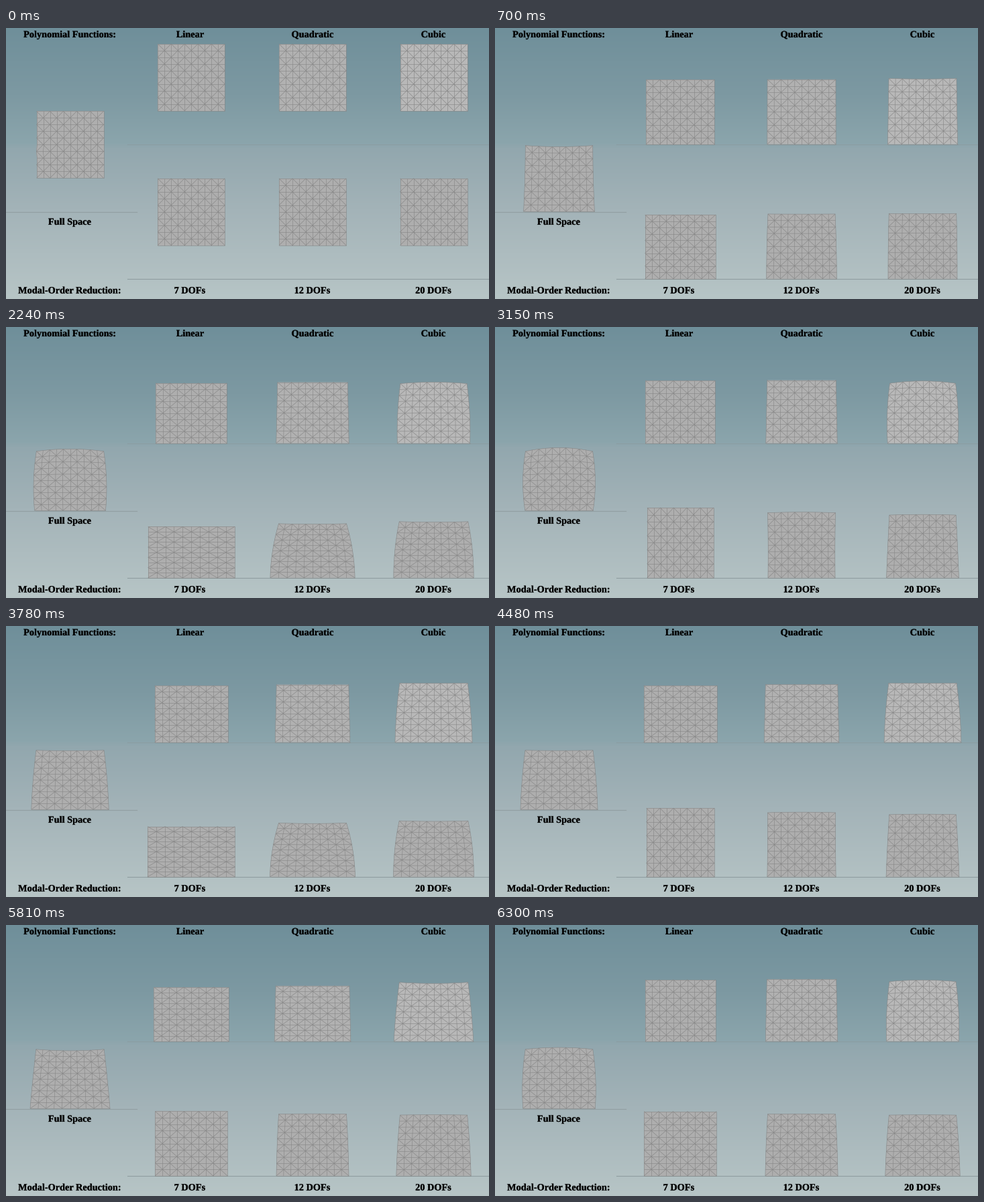
Recreate the animation shown at these times as a matplotlib script. Size 720x405 px, loop 6.37 s.

```python
import numpy as np
import matplotlib.pyplot as plt
from matplotlib.animation import FuncAnimation
from matplotlib.collections import LineCollection
from matplotlib.patches import Polygon
from matplotlib.patheffects import withStroke

W, H, DPI = 720, 405, 100
FRAMES, STEP = 91, 70
CELLS, SIDE, DROP = 10, 100, 50
CONTACT, PERIOD, SETTLE = 9.5, 21, 4
PX = 72 / DPI


def trapezoid(base, top, height):
    return [base, (base + top) / 2, top, height, height]


def box(half, height):
    return trapezoid(half, half, height)


# A pose is: half-width at base, middle and top, height at corners and centre.
REST = np.array(box(SIDE / 2, SIDE))
SAGGED = [57, 55, 50.5, 88.5, 88.5]


class Block:
    """Soft square that falls, hits the ground and wobbles around a sagged pose."""

    def __init__(self, ax, cx, ground, grey, sagged, amp, squash, decay):
        self.cx, self.ground = cx, ground
        self.sagged, self.amp = np.array(sagged), np.array(amp)
        self.squash, self.decay = squash, decay
        self.jolt = REST - self.swing(CONTACT)
        self.body = ax.add_patch(Polygon([(0, 0)] * 3, fc=grey, ec="none", zorder=3))
        self.wires = LineCollection([], colors="#868686", linewidths=0.6 * PX, zorder=4)
        ax.add_collection(self.wires)

    def swing(self, t):
        """Damped oscillation, most squashed first at time self.squash."""
        dt = t - self.squash
        wave = np.cos(2 * np.pi * dt / PERIOD) * np.exp(-self.decay * dt)
        return self.sagged + self.amp * wave

    def draw(self, frame):
        if frame <= CONTACT:
            pose, lift = REST, DROP * (1 - (frame / CONTACT) ** 2)
        else:
            pose = self.swing(frame) + self.jolt * np.exp((CONTACT - frame) / SETTLE)
            lift = 0
        base, mid, top, corner, centre = pose
        u, v = np.meshgrid(np.linspace(-1, 1, CELLS + 1), np.linspace(1, 0, CELLS + 1))
        half = (base * (1 - v) * (1 - 2 * v) + mid * 4 * v * (1 - v)
                + top * v * (2 * v - 1))
        x = self.cx + u * half
        y = self.ground - lift - v * corner - v**2 * (centre - corner) * (1 - u**2)
        grid = np.stack([x, y], axis=-1)

        cols = np.arange(CELLS + 1)
        zigzags = [grid[row + (row + cols) % 2, cols] for row in range(CELLS)]
        self.wires.set_segments(list(grid) + list(grid.transpose(1, 0, 2)) + zigzags)
        self.body.set_xy(np.concatenate(
            [grid[0], grid[1:, -1], grid[-1, -2::-1], grid[-2:0:-1, 0]]))


fig = plt.figure(figsize=(W / DPI, H / DPI), dpi=DPI)
ax = fig.add_axes([0, 0, 1, 1])
ax.axis("off")

# Sky gradient
stops = [0, 100, 172, 180, 270, H]
tones = np.array([(111, 143, 154), (125, 153, 162), (139, 165, 172),
                  (146, 167, 174), (163, 179, 184), (183, 197, 198)]) / 255
rows = np.arange(H) + 0.5
sky = np.stack([np.interp(rows, stops, tone) for tone in tones.T], axis=-1)
ax.imshow(sky[:, None, :], extent=(0, W, H, 0), aspect="auto",
          interpolation="nearest", zorder=0)
ax.set_xlim(0, W)
ax.set_ylim(H, 0)

# Ground lines
UPPER, MIDDLE, LOWER = 173.7, 274.3, 374.8
for x0, x1, y, tone in [(181, W, UPPER, "#8b9da2"), (0, 195, MIDDLE, "#919fa2"),
                        (181, W, LOWER, "#8f9da0")]:
    ax.plot([x0, x1], [y + 0.6] * 2, color=tone, lw=1.1 * PX, zorder=2)

# Labels
halo = [withStroke(linewidth=1.4, foreground=(0, 0, 0, 0.07))]
for x, y, text in [
    (95, 14, "Polynomial Functions:"), (274.5, 14, "Linear"),
    (457, 14, "Quadratic"), (637, 14, "Cubic"),
    (95, 294, "Full Space"), (95, 396.5, "Modal-Order Reduction:"),
    (274, 396.5, "7 DOFs"), (456.5, 396.5, "12 DOFs"), (637, 396.5, "20 DOFs"),
]:
    ax.text(x, y, text, ha="center", va="baseline", family="Liberation Serif",
            weight="bold", size=14.3 * PX, color="black", path_effects=halo, zorder=5)

GREY, LIGHT, PALE = "#aeaeae", "#b1b1b1", "#b8b8b8"
X_FULL, X_LEFT, X_MID, X_RIGHT = 95.5, 276.2, 457, 637.5
blocks = [
    Block(ax, X_FULL, MIDDLE, GREY, SAGGED, [29, 5, 2, 0, -25], 17, 0.03),
    Block(ax, X_LEFT, UPPER, GREY, box(54.3, 85.5), box(8.5, -28), 17, 0.02),
    Block(ax, X_MID, UPPER, LIGHT, trapezoid(55.5, 53.5, 87),
          trapezoid(8, 8, -25), 17, 0.02),
    Block(ax, X_RIGHT, UPPER, PALE, SAGGED, [19, 9, 6, -4, -18], 17, 0.025),
    Block(ax, X_LEFT, LOWER, GREY, box(57.5, 89.5), box(9, -17), 13, 0.003),
    Block(ax, X_MID, LOWER, GREY, SAGGED, [8, 6, 0, -10, -11], 13, 0.004),
    Block(ax, X_RIGHT, LOWER, GREY, SAGGED, [3.5, 3.5, 1, -6, -7], 13, 0.004),
]


def update(frame):
    for block in blocks:
        block.draw(frame)
    return [part for block in blocks for part in (block.body, block.wires)]


anim = FuncAnimation(fig, update, frames=FRAMES, interval=STEP, repeat=True,
                     repeat_delay=0, blit=False)
plt.show()
```
